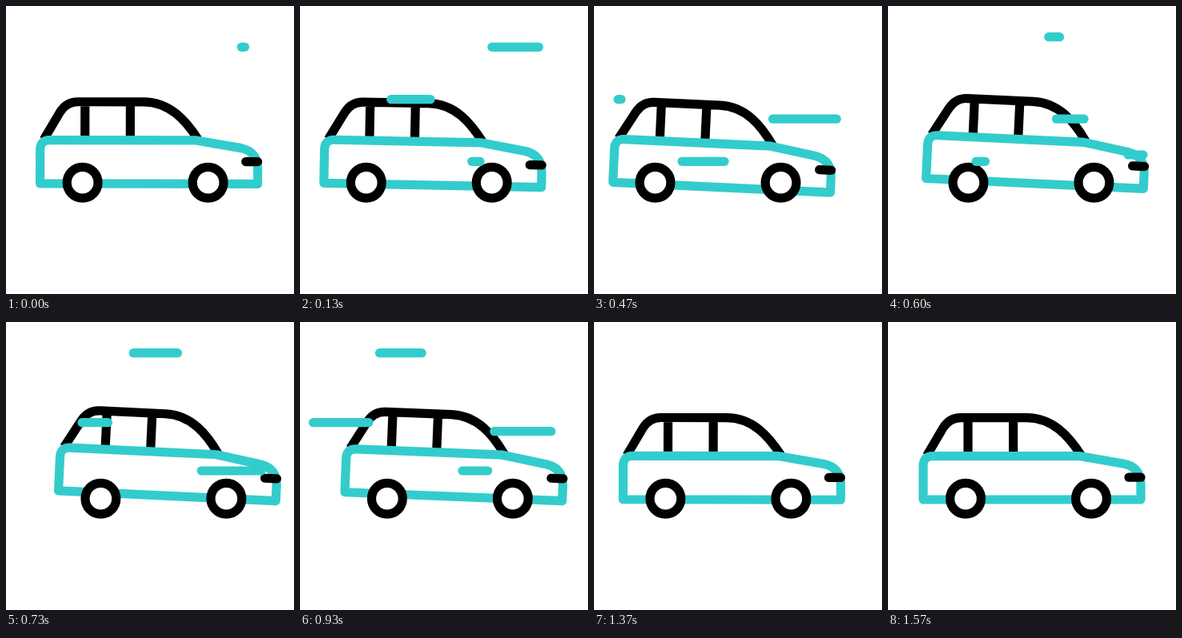
Write an HTML page that moves like this. It is 360 px wide and 360 px high and loops after 1670 ms.

```html
<!DOCTYPE html>
<html lang="en">
<head>
<meta charset="utf-8">
<title>Car</title>
<style>
  html, body { margin: 0; width: 100%; height: 100%; overflow: hidden; background: #fff; }
  svg { display: block; width: 100vw; height: 100vh; }
  .ink, .teal { fill: none; stroke-width: 11.2; stroke-linejoin: round; }
  .ink { stroke: #000; }
  .teal { stroke: #33cccc; }
  .round { stroke-linecap: round; }
  #wheels { fill: #fff; }
</style>
</head>
<body>
<svg viewBox="0 0 360 360">
  <g id="body">
    <path class="ink" d="M48.5 167 L68.5 133 Q76.5 119.7 91 119.7 H173 C206 119.7 226 143 241 166 M100 120 V166 M156.6 120 V166"/>
    <path class="teal" d="M44 222 V180 Q44 167.6 56 167.6 H239 L295 177.2 Q316 181.5 316 204 V222 Z"/>
    <path class="ink round" d="M301 194.2 H316"/>
  </g>
  <g id="wheels">
    <circle class="ink" cx="97" cy="220.7" r="19.4" style="fill:#fff"/>
    <circle class="ink" cx="254" cy="220.7" r="19.4" style="fill:#fff"/>
  </g>
  <g id="wind"></g>
</svg>
<script>
const LOOP = 1670;
const LAG = 178; // how long a streak's tail waits after its head

const $ = id => document.getElementById(id);
const body = $('body'), wheels = $('wheels'), wind = $('wind');

const progress = (t, start, end) => Math.min(1, Math.max(0, (t - start) / (end - start)));

// Soft step from 0 to 1: a cosine ease blended with a little linear motion
function step(t, start, end) {
  const p = progress(t, start, end);
  return 0.3 * p + 0.35 * (1 - Math.cos(Math.PI * p));
}

// The car backs up, surges forward, falls back and settles
function drawCar(t) {
  const back = step(t, -33, 340);
  const x = -34.5 * back + 58 * step(t, 340, 765) - 36.5 * step(t, 765, 1215) + 13 * step(t, 1215, 1570);
  const y = 5 * back - 9.9 * step(t, 450, 745) + 4.9 * step(t, 770, 1320);
  const angle = 2.7 * (back - step(t, 785, 1430));
  wheels.setAttribute('transform', `translate(${x} 0)`);
  body.setAttribute('transform', `translate(${x} ${y}) rotate(${angle} 180 222)`);
}

// A streak grows leftwards from x, then its tail catches up
function streak(y, x, length, start, duration = 270) {
  const el = document.createElementNS('http://www.w3.org/2000/svg', 'line');
  el.setAttribute('class', 'teal round');
  el.setAttribute('y1', y);
  el.setAttribute('y2', y);
  wind.append(el);
  const xAt = (t, begin) => x - length * progress(t, begin, begin + duration);
  return t => {
    const head = xAt(t, start), tail = xAt(t, start + LAG);
    el.style.display = head < tail ? '' : 'none';
    el.setAttribute('x1', head);
    el.setAttribute('x2', tail);
  };
}

const streaks = [
  streak(51.3, 298.5, 113, -10),
  streak(116.7, 163, 133, 30),
  streak(194.3, 225, 115, 98, 360),
  streak(141.2, 331.5, 121, 229),
  streak(186, 319, 116, 556),
  streak(38.7, 214.5, 115, 557, 360),
  streak(125.7, 127.5, 111, 651),
  streak(136.7, 314, 113, 760)
];

function draw(t) {
  drawCar(t);
  streaks.forEach(drawStreak => drawStreak(t));
}

let begin;
function tick(now) {
  begin ??= now;
  draw(Math.max(0, now - begin) % LOOP);
  requestAnimationFrame(tick);
}
draw(0);
requestAnimationFrame(tick);
</script>
</body>
</html>
```
